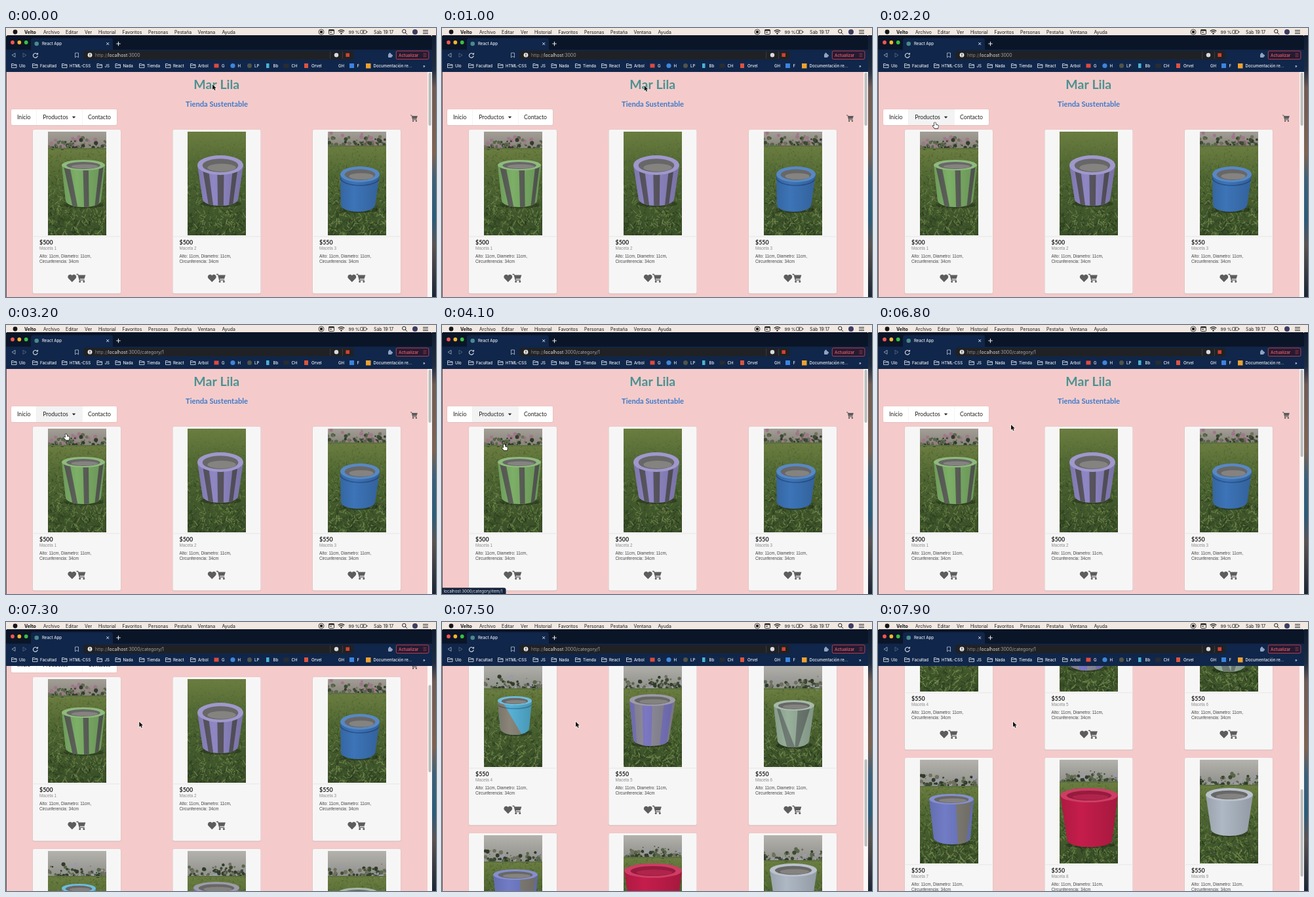
Write an HTML page with a canvas that moves like this. It is 656 px wide and 410 px high and loops after 8000 ms.

```html
<!DOCTYPE html>
<html lang="es">
<head>
<meta charset="utf-8">
<title>Tienda</title>
<style>
html, body { margin: 0; width: 100%; height: 100%; overflow: hidden; background: #f5c9c9; }
canvas { display: block; width: 656px; height: 410px; }
</style>
</head>
<body>
<canvas id="stage"></canvas>
<script>
const W = 656, H = 410, LOOP = 8000;
const stage = document.getElementById('stage');
const dpr = window.devicePixelRatio || 1;
stage.width = W * dpr;
stage.height = H * dpr;
const c = stage.getContext('2d');
const UI = 'Inter, Roboto, sans-serif';
const LATO = 'Lato, sans-serif';
const ARIAL = '"Liberation Sans", Arial, sans-serif';

function rect(x, y, w, h, fill, r = 0, g = c) {
  g.fillStyle = fill;
  g.beginPath();
  g.roundRect(x, y, w, h, r);
  g.fill();
}
function frame(x, y, w, h, stroke, r = 0, lw = 1) {
  c.strokeStyle = stroke;
  c.lineWidth = lw;
  c.beginPath();
  c.roundRect(x, y, w, h, r);
  c.stroke();
}
function oval(x, y, rx, ry, fill, g = c) {
  g.fillStyle = fill;
  g.beginPath();
  g.ellipse(x, y, rx, ry, 0, 0, 7);
  g.fill();
}
const dot = (x, y, r, fill) => oval(x, y, r, r, fill);
function text(s, x, y, size, fill, font = UI, weight = 400, align = 'left') {
  c.font = `${weight} ${size}px ${font}`;
  c.fillStyle = fill;
  c.textAlign = align;
  c.fillText(s, x, y);
}
function line(d, color, w = 1) {
  c.strokeStyle = color;
  c.lineWidth = w;
  c.stroke(new Path2D(d));
}
function shape(d, fill) {
  c.fillStyle = fill;
  c.fill(new Path2D(d));
}
function at(x, y, draw, s = 1) {
  c.save();
  c.translate(x, y);
  c.scale(s, s);
  draw();
  c.restore();
}
function random(seed) {
  return () => (seed = (seed * 16807) % 2147483647) / 2147483647;
}

// Pots: rim centre, rim radii, base centre, base half width, base bottom, wall height
const pots = [
  { rim: [54, 51, 33, 8], base: [54, 27, 115], wall: 26, color: '#7caf67', band: '#5c6059' },
  { rim: [50, 51, 35, 15], base: [50, 27, 113], wall: 0, color: '#8f87c4', band: '#595660' },
  { rim: [49, 65, 30, 12], base: [46, 26, 122], wall: 22, color: '#3c74b8', band: '' },
  { rim: [47, 57, 26, 7], base: [47, 22, 109], wall: 39, color: '#56b2d6', band: '#8a8578' },
  { rim: [44, 56, 35, 9], base: [42, 27, 126], wall: 39, color: '#8d8a99', band: '#7b77c2' },
  { rim: [46, 64, 31, 8], base: [45, 24, 128], wall: 39, color: '#98b09c', band: '#6f7c74' },
  { rim: [48, 60, 34, 8], base: [49, 28, 129], wall: 41, color: '#717cc6', band: '#827f77' },
  { rim: [45, 54, 44, 11], base: [46, 34, 133], wall: 34, color: '#c51d4b', band: '' },
  { rim: [45, 53, 36, 10], base: [45, 28, 116], wall: 39, color: '#aeb8c4', band: '' }
];
// Painted bands: left and right edge on the rim, then on the base
const bands = {
  0: [[.04, .18, .2, .34], [.49, .62, .52, .66], [.87, .97, .82, .92]],
  1: [[.1, .23, .17, .3], [.43, .58, .43, .59], [.78, .89, .74, .85]],
  3: [[0, .12, 0, .75]],
  4: [[0, .1, 0, .1], [.28, .5, .28, .5], [.76, .95, .74, .92]],
  5: [[.06, .12, .3, .55], [.6, .92, .55, .65]],
  6: [[.6, .96, .66, .88]]
};
const PW = 89, PH = 158;

function paintPhoto(p, i) {
  const cv = document.createElement('canvas');
  cv.width = PW * dpr;
  cv.height = PH * dpr;
  const g = cv.getContext('2d');
  g.scale(dpr, dpr);
  const rnd = random(37 + i * 911);
  const pick = a => a[Math.floor(rnd() * a.length)];

  const lawn = g.createLinearGradient(0, p.wall, 0, PH);
  lawn.addColorStop(0, '#6b7d40');
  lawn.addColorStop(.35, '#4f6632');
  lawn.addColorStop(1, '#384d28');
  rect(0, 0, PW, PH, lawn, 0, g);

  const tones = ['#24331b', '#2d4320', '#4a6630', '#6a8745', '#84975b'];
  for (let k = 0; k < 900; k++) {
    const y = p.wall + rnd() * (PH + 4 - p.wall), x = rnd() * PW;
    const len = 1.5 + 7 * y / PH;
    g.globalAlpha = .25 + .45 * y / PH;
    g.strokeStyle = pick(tones);
    g.lineWidth = .6 + y / PH * .8;
    g.beginPath();
    g.moveTo(x, y);
    g.lineTo(x + (rnd() - .5) * len * 1.8, y - len * rnd());
    g.stroke();
  }
  g.globalAlpha = 1;

  if (p.wall) {
    const low = i < 3;
    const wall = g.createLinearGradient(0, 0, 0, p.wall);
    wall.addColorStop(0, low ? '#a39e96' : '#b3b2ad');
    wall.addColorStop(1, low ? '#88847a' : '#8f8f89');
    rect(0, 0, PW, p.wall, wall, 0, g);
    const plants = ['#3c4a33', '#57664a', '#70705f', '#303c2a', low ? '#a0768a' : '#9b9ca6'];
    for (let k = 0; k < 80; k++) {
      const r = .8 + rnd() * 2.4;
      oval(rnd() * PW, p.wall - 1 - rnd() * rnd() * 20, r, r, pick(plants), g);
    }
    rect(0, p.wall - 1, PW, 2, '#5c7040', 0, g);
  }

  const [x, y, rx, ry] = p.rim, [bx, bw, by] = p.base;
  oval(bx + 1, by - 3, bw + 4, 5, 'rgba(20,30,15,.4)', g);
  g.save();
  g.beginPath();
  g.moveTo(x - rx, y);
  g.lineTo(bx - bw, by - 9);
  g.bezierCurveTo(bx - bw * .8, by + 3, bx + bw * .8, by + 3, bx + bw, by - 9);
  g.lineTo(x + rx, y);
  g.closePath();
  g.fillStyle = p.color;
  g.fill();
  g.clip();
  g.fillStyle = p.band;
  for (const [a, b, d, e] of bands[i] || []) {
    const top = u => x - rx + 2 * rx * u, low = u => bx - bw + 2 * bw * u;
    g.beginPath();
    g.moveTo(top(a), y);
    g.lineTo(top(b), y);
    g.lineTo(low(e), by);
    g.lineTo(low(d), by);
    g.fill();
  }
  const shade = g.createLinearGradient(x - rx, 0, x + rx, 0);
  shade.addColorStop(0, 'rgba(0,0,0,.12)');
  shade.addColorStop(.35, 'rgba(0,0,0,0)');
  shade.addColorStop(1, 'rgba(0,0,0,.16)');
  g.fillStyle = shade;
  g.fillRect(0, 0, PW, PH);
  if (i === 2 || i === 3) {
    g.strokeStyle = 'rgba(0,0,30,.28)';
    g.lineWidth = 1.5;
    g.beginPath();
    g.ellipse(x, y + 5, rx, ry, 0, 0, Math.PI);
    g.stroke();
  }
  g.restore();
  oval(x, y, rx, ry, p.color, g);
  oval(x, y, rx, ry, 'rgba(255,255,255,.14)', g);
  oval(x, y + .5, rx * .78, ry * .68, i === 7 ? '#961b3e' : '#686768', g);
  oval(x + 2, y + ry * .25, rx * .62, ry * .4, i === 7 ? '#b0244b' : '#858380', g);
  return cv;
}
const photos = pots.map(paintPhoto);

const CART = 'M0 1.2H2.6L3.2 3H13.6L11.8 8.6H5L5.3 9.8H12V11H4.1L2 2.6H0ZM6.6 12.7A1.5 1.5 0 1 1 3.6 12.7A1.5 1.5 0 1 1 6.6 12.7M12.6 12.7A1.5 1.5 0 1 1 9.6 12.7A1.5 1.5 0 1 1 12.6 12.7';
const HEART = 'M6.5 12L1 6.4C-2 2.8 3-2 6.5 2C10-2 15 2.8 12 6.4Z';

function card(i) {
  const x = 41 + (i % 3) * 213.5, y = 155 + Math.floor(i / 3) * 262;
  rect(x - .5, y - .3, 135, 251, '#d9bfc0', 2.5);
  rect(x, y, 134, 249.6, '#f7f6f6', 2);
  c.drawImage(photos[i], Math.round(x + 22.6), y + 3, PW, PH);
  rect(x + 1, y + 162.5, 132, .7, '#e2e0e0');
  text(i < 2 ? '$500' : '$550', x + 10, y + 174.5, 8.9, '#222', LATO, 700);
  text('Maceta ' + (i + 1), x + 10, y + 183, 6.35, '#8d8d8d', ARIAL);
  text('Alto: 11cm, Diametro: 11cm,', x + 10, y + 194.5, 6.35, '#444', ARIAL);
  text('Circunferencia: 34cm', x + 10, y + 203.2, 6.35, '#444', ARIAL);
  at(x + 53.3, y + 220.3, () => shape(HEART, '#5d5d5d'));
  at(x + 66.5, y + 218.5, () => shape(CART, '#5d5d5d'), 1.02);
}

function page(s) {
  rect(0, 67, 643, 343, '#f4cbca');
  c.save();
  c.beginPath();
  c.rect(1, 67, 642, 343);
  c.clip();
  c.translate(0, -s.scroll);
  text('Mar Lila', 321.3, 93, 19.5, '#4b9292', LATO, 700, 'center');
  text('Tienda Sustentable', 321.5, 120.3, 11.2, '#3e7acb', LATO, 700, 'center');
  rect(7.5, 123.8, 162, 25, '#dcbcbc', 2.5);
  rect(8, 124, 161, 24, '#fff', 2);
  if (s.hover) rect(46, 124, 70, 24, '#f3f3f3');
  rect(46, 124, .6, 24, '#ececec');
  rect(116, 124, .6, 24, '#ececec');
  text('Inicio', 17, 139, 8.7, '#222', LATO);
  text('Productos', 56.2, 139, 8.7, '#222', LATO);
  shape('M100.8 134.8H106.2L103.5 137.8Z', '#222');
  text('Contacto', 125, 139, 8.7, '#222', LATO);
  at(617, 131.5, () => shape(CART, '#5d5d5d'), .8);
  for (let i = 0; i < 9; i++) card(i);
  c.restore();

  rect(643, 67, 7, 343, '#f9f7f7');
  rect(644.6, 68 + s.scroll * .396, 4, s.thumb, '#bdbcbc', 2);
  const desk = c.createLinearGradient(0, 11, 0, 410);
  [[0, '#101c30'], [.13, '#1d2c42'], [.2, '#6f5c55'], [.45, '#7d6353'], [.55, '#3f6078'], [.7, '#2c5b78'], [.8, '#5a5352'], [1, '#1b2535']]
    .forEach(([k, col]) => desk.addColorStop(k, col));
  rect(650, 11, 6, 399, desk);
  rect(0, 67, 1, 343, '#5f5560');
}

function menuBar() {
  rect(0, 0, W, 11, '#f1e8e1');
  dot(14, 6, 3.4, '#161616');
  text('Velto', 28, 8.5, 7, '#111', UI, 700);
  [['Archivo', 57], ['Editar', 91], ['Ver', 120], ['Historial', 141], ['Favoritos', 177.5], ['Personas', 217],
   ['Pestaña', 257], ['Ventana', 292.5], ['Ayuda', 329.5]].forEach(([s, x]) => text(s, x, 8.5, 6.9, '#1a1a1a'));
  line('M485 6A4 4 0 1 1 477 6A4 4 0 1 1 485 6', '#222', .8);
  rect(479, 4, 4, 4, '#222', 1);
  frame(492.5, 2.5, 8, 7, '#222', 1, .9);
  rect(492.5, 2.5, 8, 2, '#222');
  rect(494, 6, 3, 1, '#222');
  line('M506.7 4.8Q511.5 .8 516.3 4.8M508.3 6.6Q511.5 4 514.7 6.6', '#222', 1.2);
  dot(511.5, 8.4, 1.2, '#222');
  text('99 %', 522.5, 8.5, 6.8, '#1a1a1a');
  frame(540.5, 3.5, 9, 5, '#222', 1, .7);
  shape('M545.8 3.6L543 6.4H544.8L544.2 8.6L547 5.6H545.2Z', '#222');
  rect(550.4, 5, 1, 2, '#222');
  text('Sáb 19:17', 561, 8.5, 6.9, '#1a1a1a');
  line('M610 5A2.7 2.7 0 1 1 604.6 5A2.7 2.7 0 1 1 610 5M609.3 7L612 9.8', '#222', 1);
  dot(624, 6, 4, '#3d3d63');
  line('M636 3.5H644M636 6H644M636 8.5H644', '#222', .9);
}

function folder(x) {
  line(`M${x + .5} 60.5V54.5H${x + 3.5}L${x + 4.5} 55.7H${x + 8}V60.5ZM${x + .5} 57H${x + 8}`, '#dfe5ee', .8);
}

function address(path) {
  let x = 136;
  for (const [s, col] of [['http://', '#85888d'], ['localhost', '#dcdee1'], [':3000' + path, '#a3a6ab']]) {
    text(s, x, 43.7, 6.9, col);
    x += c.measureText(s).width;
  }
}

function chrome(path) {
  rect(0, 11, 650, 23, '#0b1528', [4, 4, 0, 0]);
  rect(0, 33, 650, 34, '#10264a');
  rect(38, 15.5, 125, 19, '#10264a', [4, 4, 0, 0]);
  dot(10, 22, 2.9, '#f2584f');
  dot(20.3, 22, 2.9, '#f3b62e');
  dot(30.7, 22, 2.9, '#39bf43');
  dot(46.7, 24, 3.3, '#4a8a8c');
  text('React App', 55, 26.3, 6.1, '#e9edf3', UI, 500);
  line('M153.2 22L157.2 26M157.2 22L153.2 26', '#e4e8ee', .9);
  line('M168.3 24H174.7M171.5 20.8V27.2', '#e4e8ee', 1.1);

  line('M14 38.4L9 41.4L14 44.4Z', '#a9b5c8', .8);
  line('M26 38.4L31 41.4L26 44.4Z', '#5d6d88', .8);
  line('M47.6 40A3.4 3.4 0 1 0 48.2 42.2', '#dce3ec', 1.1);
  shape('M46 40.5H49V37.5Z', '#dce3ec');
  line('M105.5 38H110.5V45L108 43L105.5 45Z', '#b9c4d4', .8);
  rect(118, 34.8, 412, 13, '#202124', 2);
  dot(128, 41.2, 3.4, '#e3e3e3');
  rect(127.5, 39, 1, 2.7, '#202124');
  rect(127.5, 42.4, 1, 1, '#202124');
  address(path);
  rect(494.5, 36, .6, 11, '#4b4e55');
  rect(513, 36, .6, 11, '#4b4e55');
  dot(504, 41.2, 3.2, '#d9dadd');
  rect(518.4, 38.4, 5.6, 5.6, '#d3422f');
  rect(583, 39.5, 5.5, 5.5, '#8fa3c3', 1);
  dot(585.6, 39.2, 1.4, '#8fa3c3');
  dot(588.6, 42.2, 1.4, '#8fa3c3');
  rect(595, 34.8, 50, 13, '#251a32', 2);
  frame(595.3, 35, 49.6, 12.6, '#c64450', 2, .9);
  text('Actualizar', 599, 43.6, 6.3, '#f0606a', UI, 500);
  line('M636.5 39H641.5M636.5 41.3H641.5M636.5 43.6H641.5', '#a83d48', .8);

  [['Ulo', 8], ['Facultad', 40], ['HTML-CSS', 85], ['JS', 138.5], ['Nada', 166.5], ['Tienda', 203], ['React', 243], ['Arbol', 281]]
    .forEach(([s, x]) => { folder(x); text(s, x + 12, 59.8, 6.1, '#eef1f6', UI, 500); });
  rect(317.5, 54.5, 7, 6, '#dc4a3f');
  dot(346, 57.5, 3.6, '#3f86d8');
  dot(371.5, 57.5, 3.5, '#525348');
  rect(397, 54, 4.5, 7, '#46b3d6');
  rect(423.5, 54.5, 8, 6, '#2a2c31');
  rect(455, 54, 6, 7, '#dc5340');
  rect(524, 54, 7, 7, '#3b83e0');
  rect(549, 54, 7.5, 7.5, '#eda12f');
  [['G', 329], ['H', 353.5], ['LP', 379], ['Bb', 407.5], ['CH', 435.5], ['Orvel', 466], ['GH', 507], ['F', 535.5],
   ['Documentación re...', 560.5], ['»', 636]].forEach(([s, x]) => text(s, x, 59.8, 6.1, '#eef1f6', UI, 500));
}

function statusBubble() {
  rect(0, 400.5, 97.5, 10, '#14223c', [0, 3, 0, 0]);
  text('localhost:3000/category/item/1', 2.5, 407.6, 6.1, '#e8ecf2');
}

function pointer(x, y, hand) {
  at(x, y, () => {
    const d = hand
      ? 'M-1.2-3.3Q0-4.6 1-3.3L1.4-.5L4.3.2Q5.2.7 4.9 2L4.2 5H-.4L-3.3 1.6Q-3.2.3-1.9.8L-.9 1.6Z'
      : 'M0 0V8L1.9 6.3L3.2 9.2L4.6 8.6L3.3 5.8H5.8Z';
    line(d, hand ? '#111' : '#fff', 1.3);
    shape(d, hand ? '#fff' : '#111');
  });
}

function track(keys, t, ease = u => u) {
  let i = 0;
  while (i < keys.length - 2 && t >= keys[i + 1][0]) i++;
  const a = keys[i], b = keys[i + 1];
  const u = ease(Math.min(1, Math.max(0, (t - a[0]) / (b[0] - a[0]))));
  return a.slice(1).map((v, k) => v + (b[k + 1] - v) * u);
}
const smooth = u => u * u * (3 - 2 * u);
const path = [[0, 315, 86], [900, 315, 86], [1900, 87, 148], [2700, 87, 148], [3600, 95, 186], [5500, 95, 186],
  [6300, 203, 152], [7200, 203, 152], [7500, 204, 152], [7900, 206, 152]];
const wheel = [[7200, 0], [7300, 71], [7400, 220], [7500, 357], [7600, 416], [7700, 449], [7800, 466], [7900, 472]];

function draw(now) {
  const t = Math.floor((now % LOOP) / 100) * 100;
  const [x, y] = track(path, t, smooth);
  const linkHover = t >= 3400 && t < 5800;
  c.setTransform(dpr, 0, 0, dpr, 0, 0);
  page({
    scroll: track(wheel, t)[0],
    thumb: t < 4500 ? 81 : 133,
    hover: t >= 1800 && t < 5800
  });
  menuBar();
  chrome(t < 3000 ? '' : '/category/1');
  if (linkHover) statusBubble();
  pointer(x, y, t >= 1800 && t < 5800);
}

const start = performance.now();
function tick() {
  draw(performance.now() - start);
  requestAnimationFrame(tick);
}
tick();
</script>
</body>
</html>
```
